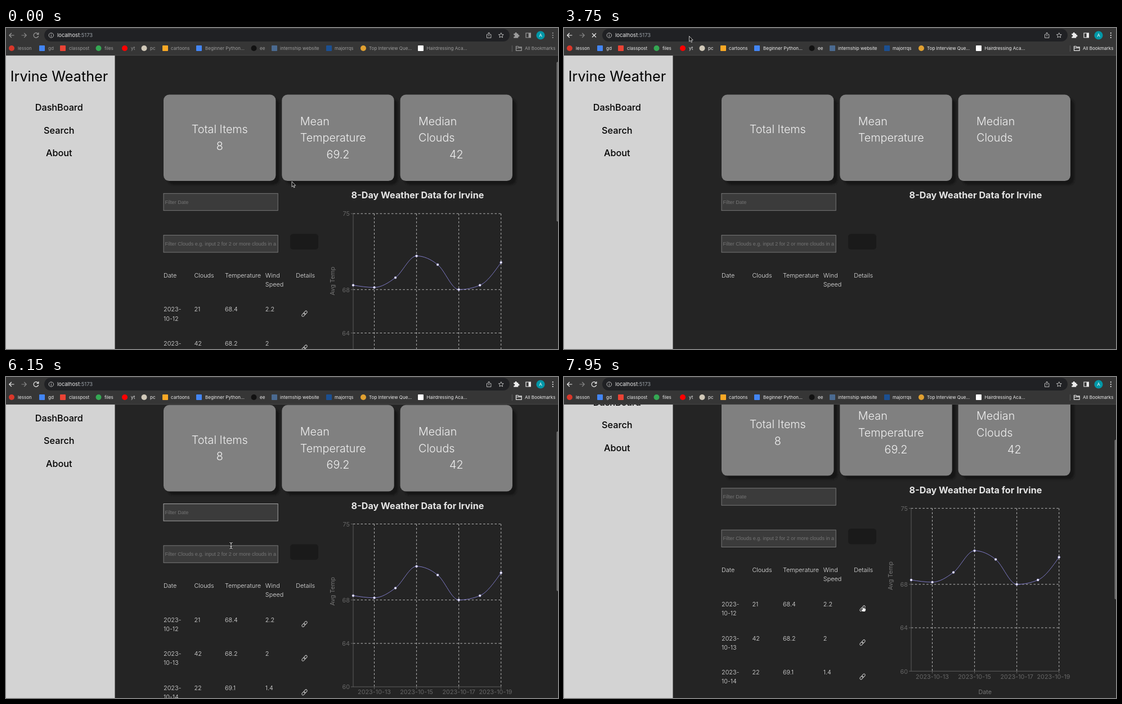
Recreate the animation shown at these times as an HTML page. Size 981 px wide and 571 px high, loop 8000 ms.

```html
<!DOCTYPE html>
<html lang="en">
<head>
<meta charset="utf-8">
<title>Weather dashboard</title>
<style>
html, body { margin: 0; width: 100%; height: 100%; overflow: hidden; background: #242424; }
svg { display: block; width: 981px; height: 571px; font-family: Inter, "Open Sans", sans-serif; }
text { white-space: pre; }
.arial { font-family: "Liberation Sans", Arial, sans-serif; }
.fg { fill: #ececec; }
.line { fill: none; stroke: #ececec; stroke-width: 1.2; }
.idle .fg { fill: #9c9c9c; }
.idle .line { stroke: #9c9c9c; }
</style>
</head>
<body>
<svg id="stage" viewBox="0 0 981 571">
  <defs>
    <filter id="soft" x="-10%" y="-10%" width="125%" height="130%"><feGaussianBlur stdDeviation="1.6"/></filter>
    <filter id="drop" x="-5%" y="-10%" width="110%" height="130%"><feGaussianBlur stdDeviation="3"/></filter>
  </defs>
  <rect width="981" height="571" fill="#242424"/>
  <rect y="48" width="193.5" height="523" fill="#d3d3d3"/>
  <g id="page"></g>
  <rect id="thumb" x="978.5" width="4" rx="2" fill="#6f6f6f"/>
  <g id="chrome"></g>
  <g id="menu"></g>
  <g id="cursor"></g>
</svg>
<script>
const LOOP = 8000, STEP = 150;
const $ = id => document.getElementById(id);

function add(parent, tag, attrs, content) {
  const e = document.createElementNS('http://www.w3.org/2000/svg', tag);
  for (const k in attrs) e.setAttribute(k, attrs[k]);
  if (content != null) e.textContent = content;
  parent.appendChild(e);
  return e;
}
const group = (p, attrs = {}) => add(p, 'g', attrs);
const text = (p, x, y, str, size, fill, more = {}) =>
  add(p, 'text', { x, y, 'font-size': size, ...(fill ? { fill } : {}), ...more }, str);
const rect = (p, x, y, width, height, fill, more = {}) =>
  add(p, 'rect', { x, y, width, height, fill, ...more });
const dot = (p, cx, cy, r, fill, more = {}) => add(p, 'circle', { cx, cy, r, fill, ...more });
const path = (p, d, more = {}) => add(p, 'path', { d, ...more });
const show = (e, on) => e.setAttribute('visibility', on ? 'visible' : 'hidden');
const MID = { 'text-anchor': 'middle' };

// ---- page ----
const page = $('page');
text(page, 94.5, 95.3, 'Irvine Weather', 25.2, '#000', MID);
['DashBoard', 'Search', 'About'].forEach((s, i) =>
  text(page, 94.3, 147.3 + 40.5 * i, s, 16.2, '#000', { ...MID, 'font-weight': 500 }));

[280, 490.3, 700.6].forEach(x => {
  rect(page, x + 7, 125.5, 199.4, 153.6, '#171717', { rx: 10, filter: 'url(#soft)' });
  rect(page, x, 118.5, 199.4, 153.6, '#808080', { rx: 10 });
});
const cardText = (p, x, y, s, more = {}) => text(p, x, y, s, 19.8, '#f0f0f0', { 'font-weight': 300, ...more });
cardText(page, 379.8, 187.4, 'Total Items', MID);
cardText(page, 522.8, 172.6, 'Mean');
cardText(page, 522.8, 202.3, 'Temperature');
cardText(page, 733, 172.6, 'Median');
cardText(page, 733, 202.3, 'Clouds');

const field = (y, hint) => {
  const box = rect(page, 280, y, 203.2, 30.4, '#3b3b3b', { stroke: '#808080', 'stroke-width': 0.9 });
  text(page, 282.6, y + 18.3, hint, 9.03, '#757575', { class: 'arial' });
  return box;
};
const dateBox = field(294.3, 'Filter Date');
field(368.6, 'Filter Clouds e.g. input 2 for 2 or more clouds in a');
rect(page, 505, 366.3, 50, 27.6, '#1a1a1a', { rx: 5 });

const COLS = [280, 334.4, 389, 460.8, 515.2];
const cell = (p, x, y, s) => text(p, x, y, s, 10.83, '#e3e3e3', { 'font-weight': 300 });
['Date', 'Clouds', 'Temperature', 'Wind', 'Details'].forEach((s, i) => cell(page, COLS[i], 443.6, s));
cell(page, COLS[3], 459.8, 'Speed');

const data = group(page);
cardText(data, 379.8, 217.1, '8', MID);
cardText(data, 590, 232, '69.2', MID);
cardText(data, 800.3, 232, '42', MID);
[['12', 21, 68.4, 2.2], ['13', 42, 68.2, 2], ['14', 22, 69.1, 1.4]].forEach(([day, ...vals], i) => {
  const y = 504.3 + 60.7 * i;
  cell(data, COLS[0], y, '2023-');
  cell(data, COLS[0], y + 16.2, '10-' + day);
  vals.forEach((v, k) => cell(data, COLS[k + 1], y, v));
  const link = group(data, { transform: `translate(530.5 ${y + 3.9}) rotate(-47)`, fill: 'none', stroke: '#c4c4c4' });
  [-6, -0.8].forEach(x => add(link, 'rect', { x, y: -2, width: 6.8, height: 4, rx: 2 }));
});

// ---- chart ----
text(page, 731.5, 303.3, '8-Day Weather Data for Irvine', 16.2, '#e6e6e6', { ...MID, 'font-weight': 700 });
const TEMPS = [68.4, 68.2, 69.1, 71.1, 70.3, 68, 68.4, 70.5];
const DX = 37.54, px = i => 617 + DX * i, py = v => 619.8 - (v - 60) * 19.31;
const grid = d => path(data, d, { fill: 'none', stroke: '#ccc', 'stroke-width': 0.9, 'stroke-dasharray': '3.5 3.3' });
const axis = d => path(data, d, { fill: 'none', stroke: '#666', 'stroke-width': 0.9 });
[75, 68, 64, 60].forEach(v => {
  const y = py(v);
  if (v > 60) grid(`M617 ${y}H${px(7)}`);
  axis(`M613 ${y}H617`);
  text(data, 611, y + 4.3, v, 10.83, '#666', { 'text-anchor': 'end' });
});
[1, 3, 5, 7].forEach(i => {
  grid(`M${px(i)} ${py(75)}V${py(60)}`);
  axis(`M${px(i)} ${py(60)}v4`);
  text(data, i < 7 ? px(i) : 870, 633.2, '2023-10-' + (12 + i), 10.83, '#666', MID);
});
axis(`M617 ${py(75)}V${py(60)}H${px(7)}`);
text(data, 748.3, 660.5, 'Date', 10.83, '#757575', MID);
text(data, 0, 0, 'Avg Temp', 10.83, '#757575', { ...MID, transform: 'translate(584 450) rotate(-90)' });

// monotone cubic through the points
const ys = TEMPS.map(py), slope = ys.slice(1).map((y, i) => (y - ys[i]) / DX);
const tan = ys.map((_, i) => {
  const a = slope[i - 1], b = slope[i];
  if (a === undefined || b === undefined) return 0;
  return (Math.sign(a) + Math.sign(b)) * Math.min(Math.abs(a), Math.abs(b), Math.abs(a + b) / 4);
});
tan[0] = (3 * slope[0] - tan[1]) / 2;
tan[7] = (3 * slope[6] - tan[6]) / 2;
const h = DX / 3;
let curve = `M${px(0)} ${ys[0]}`;
for (let i = 0; i < 7; i++)
  curve += `C${px(i) + h} ${ys[i] + tan[i] * h} ${px(i + 1) - h} ${ys[i + 1] - tan[i + 1] * h} ${px(i + 1)} ${ys[i + 1]}`;
path(data, curve, { fill: 'none', stroke: '#8884d8', 'stroke-width': 0.9 });
ys.forEach((y, i) => dot(data, px(i), y, 2, '#fff', { stroke: '#8884d8', 'stroke-width': 0.6 }));

// ---- browser bar ----
const bar = $('chrome');
rect(bar, 0, 0, 981, 49, '#363636');
rect(bar, 0, 48.2, 981, 0.9, '#484848');
rect(bar, 68, 1.5, 827, 22.6, '#202124', { rx: 11.3 });
path(bar, 'M14.5 13H6M9.8 9L5.8 13l4 4', { class: 'line' });
path(bar, 'M27.5 13H36M32.2 9l4 4l-4 4', { fill: 'none', stroke: '#888', 'stroke-width': 1.2 });
const reload = path(bar, 'M57 10.6A4.3 4.3 0 1 0 57.6 14M57.8 8v3.3h-3.3', { class: 'line' });
const stop = path(bar, 'M50 9.5l7 7M57 9.5l-7 7', { class: 'line' });
dot(bar, 80.3, 13, 4.2, 'none', { stroke: '#c8c8c8', 'stroke-width': 0.9 });
path(bar, 'M80.3 12.5v3M80.3 10.3v1.1', { stroke: '#c8c8c8', 'stroke-width': 1 });
path(bar, 'M856.3 11.5h-1.8v6h7.4v-6h-1.8M858.2 15V8.2M856 10.2l2.2-2.2l2.2 2.2', { fill: 'none', stroke: '#ccc', 'stroke-width': 0.9 });
path(bar, 'M879.8 8.6l1.3 2.9l3.1 .3l-2.3 2.1l.7 3.1l-2.8-1.6l-2.8 1.6l.7-3.1l-2.3-2.1l3.1-.3z', { fill: 'none', stroke: '#ccc', 'stroke-width': 0.9 });
path(bar, 'M902.3 10h2.3a1.7 1.7 0 1 1 3.2 0h2.4v2.3a1.7 1.7 0 1 1 0 3.2v2.3h-7.9v-2.4a1.6 1.6 0 1 0 0-3.1z', { class: 'fg' });
path(bar, 'M924 9h8.4v8h-8.4z', { class: 'line' });
rect(bar, 928.6, 9, 3.8, 8, null, { class: 'fg' }).removeAttribute('fill');
dot(bar, 950, 13, 7.6, '#0097a7');
text(bar, 950, 16, 'A', 8.2, '#fff', MID);
[9, 13, 17].forEach(y => add(bar, 'circle', { cx: 971.8, cy: y, r: 1.1, class: 'fg' }));

const select = rect(bar, 91, 7, 65, 12, '#3f638b');
const url = (p, x, tail) => {
  const t = text(p, x, 16.4, '', 9.4);
  add(t, 'tspan', { fill: '#ececec' }, 'localhost');
  add(t, 'tspan', { fill: '#9aa0a6' }, tail);
};
url(bar, 91, ':5173');
const caret = rect(bar, 0, 7.5, 0.9, 11, '#e8e8e8');

// bookmarks: icon x, text x, label, colour, round?
[
  [10, 21, 'lesson', '#d8372a', 1], [64, 75, 'gd', '#4285f4', 0], [101, 112, 'classpost', '#ea4335', 0],
  [164.5, 175, 'files', '#34a853', 1], [211, 222, 'yt', '#f00', 1], [245.5, 256, 'pc', '#d0c8b8', 1],
  [283, 293, 'cartoons', '#f9a825', 0], [343, 354, 'Beginner Python…', '#4285f4', 0], [440.5, 451, 'ee', '#111', 1],
  [477, 487, 'internship website', '#4a6a90', 0], [574, 584, 'majorrqs', '#1b4f91', 0],
  [635, 645, 'Top Interview Que…', '#e0a030', 1], [737, 747.5, 'Hairdressing Aca…', '#fff', 0]
].forEach(([ix, tx, label, fill, round]) => {
  rect(bar, ix - 5, 31, 10, 10, fill, { rx: round ? 5 : 1 });
  text(bar, tx, 39.1, label, 8.05, null, { class: 'fg' });
});
rect(bar, 899, 31, 0.8, 11, '#666');
path(bar, 'M906.5 32.5h3.4l1 1.3h5.3v6.4h-9.7zM906.5 35.5h9.7', { class: 'line' });
text(bar, 922, 39.1, 'All Bookmarks', 8.05, null, { class: 'fg' });

// ---- suggestion list ----
const menu = $('menu');
const SHEET = 'M64 0H896V159a9 9 0 0 1-9 9H73a9 9 0 0 1-9-9z';
path(menu, SHEET, { transform: 'translate(0 3)', fill: '#000', opacity: 0.45, filter: 'url(#drop)' });
path(menu, SHEET, { fill: '#202124' });
rect(menu, 64, 27.5, 832, 27, '#3b3c3f');
rect(menu, 64, 27.5, 2, 27, '#9fd0d0');
[13, 41, 95, 122, 149].forEach(y => dot(menu, 80.3, y, 5, '#9a5cf5'));
url(menu, 98.3, ':5173/');
rect(menu, 167, 7.5, 0.9, 11, '#e8e8e8');
const suggest = (y, name, parts) => {
  const t = text(menu, 98.3, y + 3.4, '', 9.4);
  add(t, 'tspan', { fill: '#ececec' }, name);
  parts.forEach(([s, fill, weight]) => add(t, 'tspan', { fill, 'font-weight': weight || 400 }, s));
};
const BLUE = '#7aa7f5', GREY = '#9aa0a6';
suggest(41, 'Vite + React', [[' - ', GREY], ['localhost:5173', BLUE, 600]]);
suggest(68, 'localhost:5173/', [[' - Online Search', GREY]]);
['/2023-10-12', '/2023-10-19', '//2023-10-12'].forEach((s, i) =>
  suggest(95 + 27 * i, 'Vite + React', [[' - ', GREY], ['localhost:5173/', BLUE, 600], [s.slice(1), BLUE]]));
path(menu, 'M84.2 72l-2.6-2.6', { stroke: '#bbb', 'stroke-width': 1.2 });
dot(menu, 79.3, 67.2, 2.9, 'none', { stroke: '#bbb', 'stroke-width': 1.1 });
path(menu, 'M879.6 38.2l5.6 5.6M885.2 38.2l-5.6 5.6', { stroke: '#ddd', 'stroke-width': 1 });

// ---- pointers ----
const cur = $('cursor');
const pointers = {
  arrow: path(cur, 'M0 0V9.6L2.2 7.6L3.7 11L5.2 10.3L3.8 7.1H6.7z', { fill: '#111', stroke: '#eee', 'stroke-width': 0.8 }),
  beam: group(cur),
  hand: path(cur, 'M-1.6-4.5q1-1 1.7 .2V-1q3.5 0 4.3 1.2V3L3 5.5H-1.6L-4.4 1.8q.4-1.4 1.8-.3L-1.6 2z', { fill: '#fff', stroke: '#111', 'stroke-width': 0.7 })
};
[['#111', 2.4], ['#eee', 1]].forEach(([stroke, w]) =>
  path(pointers.beam, 'M-2.6-5.5Q0-5.5 0-3.8Q0-5.5 2.6-5.5M0-4V4M-2.6 5.5Q0 5.5 0 3.8Q0 5.5 2.6 5.5M-1.5 1.5H1.5', { fill: 'none', stroke, 'stroke-width': w }));

// ---- timing ----
const MOVES = [
  [0, 508, 273], [150, 480, 235], [300, 400, 140], [450, 290, 60], [600, 240, 24], [750, 226, 16],
  [2850, 226, 16], [3000, 222.5, 14.5], [4200, 222.5, 14.5], [4350, 290, 150], [4500, 370, 270],
  [4650, 400, 300], [7050, 400, 300], [7200, 404, 309], [7950, 532, 412]
];
const SCROLL = [
  [0, 0], [4950, 0], [5100, 8], [5250, 35], [5400, 68], [5550, 93.7], [5700, 100], [5850, 98], [6000, 86],
  [6150, 68.7], [6300, 45], [6450, 21], [6600, 5], [6750, -1], [6900, -2.6], [7200, -2.6],
  [7350, 12], [7500, 40], [7650, 68], [7800, 88], [7950, 96.5]
];
const POINTER = [[0, 'arrow'], [750, 'beam'], [3000, 'arrow'], [4650, 'beam'], [7350, 'arrow'], [7950, 'hand']];
const CARET = [[0, 0], [1200, 134], [1650, 91], [1950, 134], [2700, 156], [3000, 0]];

function at(keys, t, col = 1) {
  const i = keys.findLastIndex(k => k[0] <= t), a = keys[i], b = keys[i + 1];
  return b ? a[col] + (b[col] - a[col]) * (t - a[0]) / (b[0] - a[0]) : a[col];
}
const held = (keys, t) => keys.findLast(k => k[0] <= t)[1];
const within = (t, a, b) => t >= a && t < b;

function draw(now) {
  const t = Math.floor(now % LOOP / STEP) * STEP;
  const s = at(SCROLL, t), over = Math.min(s, 0), loading = within(t, 3600, 4050);
  page.setAttribute('transform', `translate(0 ${-s})`);
  const thumb = $('thumb');
  thumb.setAttribute('y', 60.3 + Math.max(s, 0) * 0.53);
  thumb.setAttribute('height', 284 + over * 0.6);
  thumb.setAttribute('opacity', t < 450 ? 1 - t / 450 : t >= 5100 ? 1 : 0);
  bar.setAttribute('class', t < 150 ? 'idle' : '');
  dateBox.setAttribute('stroke', within(t, 4500, 7350) ? '#b4b4b4' : '#808080');
  show(data, t !== 3750);
  show(reload, !loading);
  show(stop, loading);
  show(select, t === 1050);
  const c = held(CARET, t);
  show(caret, c > 0);
  caret.setAttribute('x', c);
  show(menu, within(t, 3000, 3600));
  cur.setAttribute('transform', `translate(${at(MOVES, t)} ${at(MOVES, t, 2)})`);
  const kind = held(POINTER, t);
  for (const k in pointers) show(pointers[k], k === kind);
}
function tick() {
  draw(performance.now());
  requestAnimationFrame(tick);
}
tick();
</script>
</body>
</html>
```
